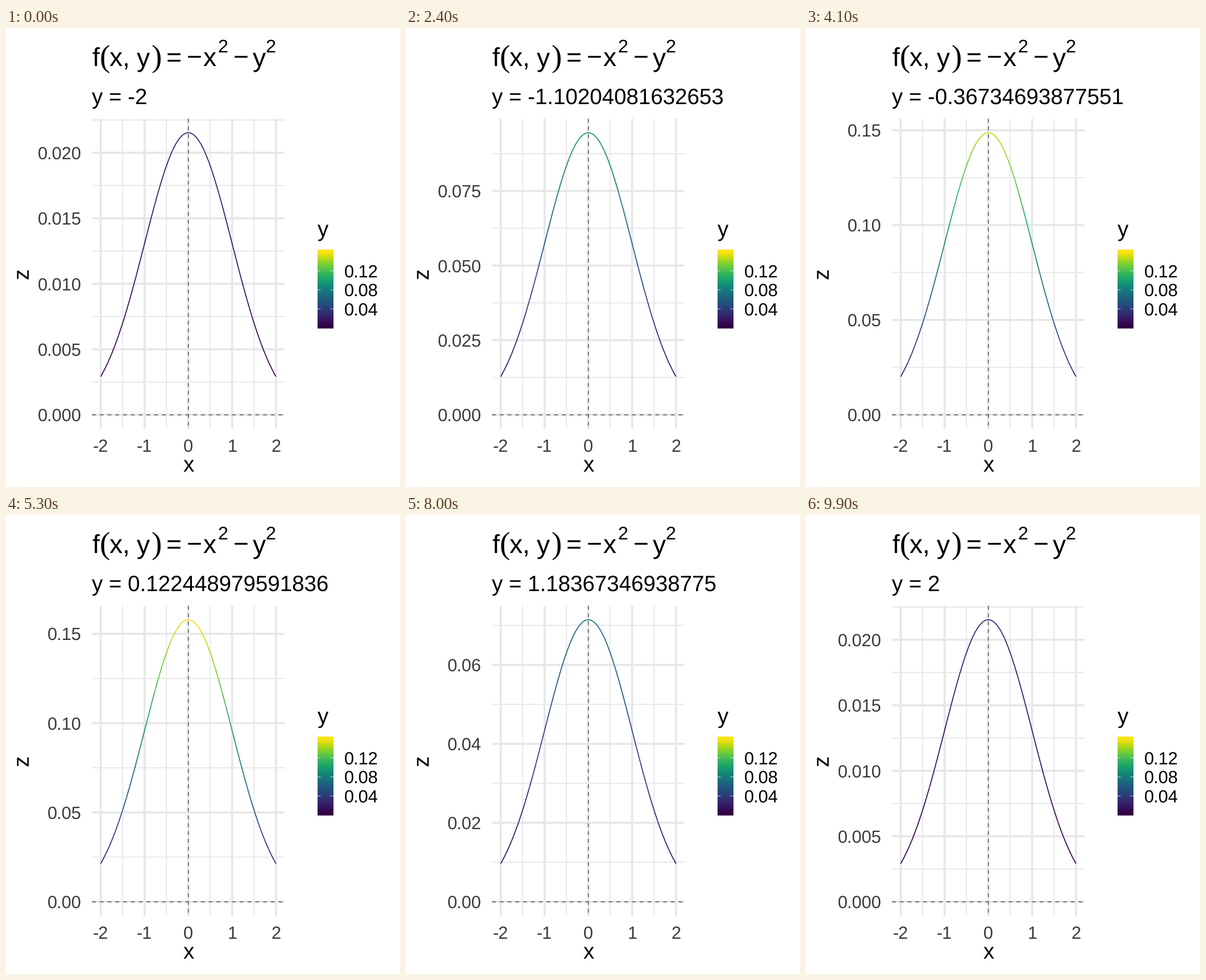
Animation of 693x808 px, one loop 10 s. Source, as a matplotlib script:

```python
import math

import numpy as np
import matplotlib.pyplot as plt
from matplotlib.animation import FuncAnimation
from matplotlib.collections import LineCollection

W, H, DPI = 693, 808, 64
PX = 72 / DPI                       # points per pixel
LEFT, RIGHT, TOP, BOTTOM = 151.2, 490.2, 159.7, 705.7
BASE = 38.5                         # base text size in pixels
SMALL, TITLE = 0.8 * BASE, 1.2 * BASE
LINE = 1.71
GAMMA = 1.22                        # the display profile darkens midtones
STATES = 50

plt.rcParams.update({
    "font.family": "Liberation Sans",
    "path.snap": False,
    "text.hinting": "none",
})

grid = -2 + np.arange(STATES) * (4 / (STATES - 1))
grid[-1] = 2


def density(x, y):
    return np.exp(-(x ** 2 + y ** 2) / 2) / (2 * math.pi)


Z_MIN = density(2, 2)
Z_MAX = density(grid, grid).max()
viridis = plt.get_cmap("viridis")


def shade(z):
    return viridis((np.asarray(z) - Z_MIN) / (Z_MAX - Z_MIN)) ** GAMMA


def grey(level):
    return (level ** GAMMA,) * 3


GRID, LABEL, DASH = grey(0.922), grey(0.302), grey(0.48)


def nice_breaks(lo, hi, m=5):
    """Extended Wilkinson tick labelling."""
    Q = (1, 5, 2, 2.5, 4, 3)
    span = hi - lo
    best, result = -2, (0, 1, 2)
    j = 1
    while True:
        for i, q in enumerate(Q):
            simple_max = 1 - i / (len(Q) - 1) - j + 1
            if 0.25 * simple_max + 0.75 < best:
                return result
            k = 2
            while True:
                dens_max = 2 - (k - 1) / (m - 1) if k >= m else 1
                if 0.25 * simple_max + 0.25 + 0.5 * dens_max < best:
                    break
                z = math.ceil(math.log10(span / (k + 1) / (j * q)))
                while True:
                    step = j * q * 10.0 ** z
                    half = max(0, (step * (k - 1) - span) / 2)
                    cover_max = 1 - half ** 2 / (0.1 * span) ** 2
                    if (0.25 * simple_max + 0.2 * cover_max
                            + 0.5 * dens_max + 0.05 < best):
                        break
                    first = math.floor(hi / step) * j - (k - 1) * j
                    last = math.ceil(lo / step) * j
                    for start in range(first, last + 1):
                        a = start * step / j
                        b = a + step * (k - 1)
                        zero = start % j == 0 and a <= 0 <= b
                        simple = simple_max - 1 + zero
                        cover = 1 - 0.5 * ((hi - b) ** 2 + (lo - a) ** 2) / (0.1 * span) ** 2
                        r = (k - 1) / (b - a)
                        rt = (m - 1) / (max(b, hi) - min(a, lo))
                        dens = 2 - max(r / rt, rt / r)
                        score = 0.25 * simple + 0.2 * cover + 0.5 * dens + 0.05
                        if score > best:
                            best, result = score, (a, step, k)
                    z += 1
                k += 1
        j += 1


def decimals(values):
    d = 0
    while any(abs(v - round(v, d)) > 1e-9 for v in values):
        d += 1
    return d


fig = plt.figure(figsize=(W / DPI, H / DPI), dpi=DPI, facecolor="white")
ax = fig.add_axes([0, 0, 1, 1])


def text(x, y, s, size=BASE, color="black", **kw):
    return ax.text(x, y, s, fontsize=size * PX, color=color, **kw)


def line(xs, ys, width, color, **kw):
    return ax.plot(xs, ys, lw=width * PX, color=color,
                   solid_capstyle="butt", dash_capstyle="butt", **kw)[0]


def grid_line(pos, major, vertical):
    xs, ys = ([pos, pos], [TOP, BOTTOM]) if vertical else ([LEFT, RIGHT], [pos, pos])
    return line(xs, ys, 3.7 if major else 1.85, GRID, zorder=2 if major else 1)


def x_px(x):
    return LEFT + (x + 2.2) / 4.4 * (RIGHT - LEFT)


def draw_title():
    base = 67
    for x, s in ((LEFT, "f"), (181.5, "x"), (204.5, ","), (230, "y"),
                 (281.7, "="), (317.7, "\u2212"), (346.8, "x"),
                 (399.7, "\u2212"), (433.4, "y")):
        text(x, base, s, TITLE)
    for x, s in ((164.2, "("), (255.3, ")")):
        text(x, base, s, 55, family="Liberation Serif")
    for x in (372.3, 456.3):
        text(x, 43, "2", 0.7 * TITLE)


def draw_legend():
    x0, x1, top, bottom = 548, 575.6, 391, 529.3
    pad = (bottom - top) / 40       # half of one of 20 bins
    run = bottom - top - 2 * pad

    t = np.linspace(top, bottom, 277)
    frac = np.clip((bottom - pad - t) / run, 0, 1)
    ax.imshow(shade(Z_MIN + frac * (Z_MAX - Z_MIN))[:, None, :],
              extent=(x0, x1, bottom, top), aspect="auto", interpolation="nearest")
    text(x0, 367, "y")
    for v in (0.04, 0.08, 0.12):
        y = bottom - pad - (v - Z_MIN) / (Z_MAX - Z_MIN) * run
        for a, b in ((x0, x0 + 5.5), (x1 - 5.5, x1)):
            line([a, b], [y, y], 0.7, "white", zorder=3)
        text(594.5, y + 11, f"{v:.2f}", SMALL)


draw_title()
draw_legend()
for n in range(-4, 5):
    grid_line(x_px(n / 2), n % 2 == 0, True)
for n in range(-2, 3):
    text(x_px(n), 746, str(n), SMALL, LABEL, ha="center")
text(x_px(0), 781, "x", ha="center")
text(39, (TOP + BOTTOM) / 2, "z", rotation=90, rotation_mode="anchor",
     ha="center", va="baseline")

ZERO = BOTTOM - (BOTTOM - TOP) * 0.05 / 1.1
PEAK = TOP + (BOTTOM - TOP) * 0.05 / 1.1
for xs, ys in (([LEFT, RIGHT], [ZERO, ZERO]), ([x_px(0)] * 2, [TOP, BOTTOM])):
    line(xs, ys, LINE, DASH, ls=(0, (4, 4)), zorder=4)

curve = LineCollection([], linewidths=LINE * PX, zorder=5, capstyle="butt")
ax.add_collection(curve, autolim=False)
subtitle = text(LEFT, 133.5, "")
ax.set_xlim(0, W)
ax.set_ylim(H, 0)
ax.axis("off")

scale_parts = []


def draw_scale(peak):
    while scale_parts:
        scale_parts.pop().remove()

    def y_px(z):
        return ZERO - z / peak * (ZERO - PEAK)

    lo, hi = -0.05 * peak, 1.05 * peak
    start, step, count = nice_breaks(lo, hi)
    ticks = [start + n * step for n in range(-1, count + 1)]
    for v in ticks:
        if lo <= v + step / 2 <= hi:
            scale_parts.append(grid_line(y_px(v + step / 2), False, False))
    shown = [v for v in ticks[1:-1] if lo <= v <= hi]
    places = decimals(shown)
    for v in shown:
        y = y_px(v)
        scale_parts.append(grid_line(y, True, False))
        scale_parts.append(text(133, y + 11, f"{abs(v):.{places}f}", SMALL,
                                LABEL, ha="right"))
    return y_px


def update(frame):
    # The subtitle trails the curve by one step.
    y = grid[frame // 2]
    label = grid[max(frame - 1, 0) // 2]
    subtitle.set_text(f"y = {label:.15g}")
    z = density(grid, y)
    y_px = draw_scale(z.max())
    pts = np.column_stack([x_px(grid), y_px(z)])
    curve.set_segments(np.stack([pts[:-1], pts[1:]], axis=1))
    curve.set_color(shade(z[:-1]))
    return [curve, subtitle, *scale_parts]


anim = FuncAnimation(fig, update, frames=2 * STATES, interval=100,
                     init_func=lambda: update(0), repeat=True, repeat_delay=0, blit=False)
plt.show()
```
